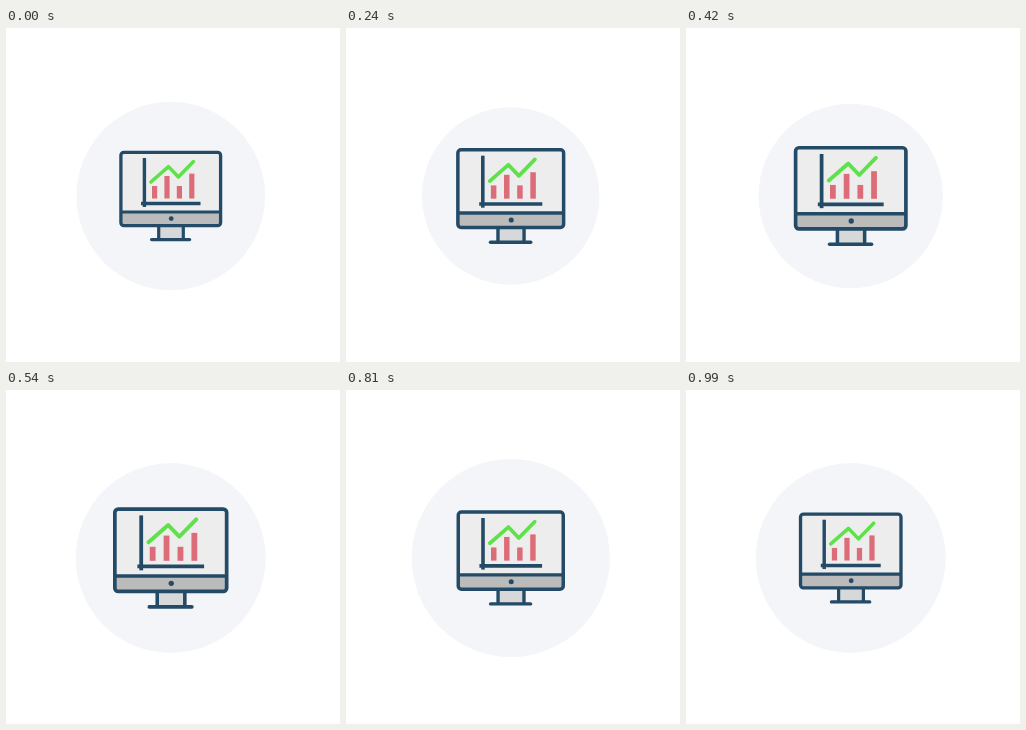
An HTML page with a canvas for the animation above (1020 ms loop, 334 by 334 pixels).

```html
<!DOCTYPE html>
<html lang="en">
<head>
<meta charset="utf-8">
<title>Chart monitor</title>
<style>
  html, body { margin: 0; width: 100%; height: 100%; overflow: hidden; background: #fff; }
  canvas { display: block; width: 334px; height: 334px; }
</style>
</head>
<body>
<canvas id="stage"></canvas>
<script>
const SIZE = 334, LOOP = 1020, STEP = 30;
const CX = 164.75, CY = 168;
const NAVY = '#234a66', RED = '#dc6d78', GREEN = '#5fe14a';

const canvas = document.getElementById('stage');
const ctx = canvas.getContext('2d');
const dpr = window.devicePixelRatio || 1;
canvas.width = canvas.height = Math.round(SIZE * dpr);

// Linear there-and-back: 0 at p = 0, 1 at p = 0.5
const pingPong = p => 1 - Math.abs(1 - 2 * (((p % 1) + 1) % 1));

function line(points, color, width, cap = 'butt') {
  ctx.beginPath();
  points.forEach(([x, y]) => ctx.lineTo(x, y));
  ctx.strokeStyle = color;
  ctx.lineWidth = width;
  ctx.lineCap = cap;
  ctx.lineJoin = 'round';
  ctx.stroke();
}

function disc(x, y, r, color) {
  ctx.beginPath();
  ctx.arc(x, y, r, 0, Math.PI * 2);
  ctx.fillStyle = color;
  ctx.fill();
}

function box(x0, y0, x1, y1, color) {
  ctx.fillStyle = color;
  ctx.fillRect(x0, y0, x1 - x0, y1 - y0);
}

function drawMonitor() {
  // Stand
  box(152.7, 198, 177.3, 211.5, '#d6d8d9');
  line([[152.7, 198], [152.7, 211]], NAVY, 3.2);
  line([[177.3, 198], [177.3, 211]], NAVY, 3.2);
  line([[145.6, 211.6], [183.6, 211.6]], NAVY, 3.2, 'round');

  // Case
  ctx.beginPath();
  ctx.roundRect(114.9, 124.4, 99.7, 73.3, 3);
  ctx.save();
  ctx.clip();
  box(114, 124, 216, 184, '#ededee');
  box(114, 184, 216, 199, '#bbbbbb');
  ctx.restore();
  ctx.strokeStyle = NAVY;
  ctx.lineWidth = 3.3;
  ctx.stroke();
  line([[114.9, 184], [214.6, 184]], NAVY, 3.2);
  disc(165.2, 190.6, 2.4, NAVY);

  // Chart
  line([[138.4, 130], [138.4, 179]], NAVY, 3.4);
  line([[135, 175.5], [194.5, 175.5]], NAVY, 3.4);
  [158, 148, 158, 145.6].forEach((top, i) => {
    const x = 146 + i * 12.4;
    box(x, top, x + 5.2, 170.5, RED);
  });
  line([[144.9, 154], [162.5, 138.6], [172.4, 149], [187.5, 133.5]], GREEN, 3.5, 'round');
}

function draw(t) {
  const p = Math.floor((t % LOOP) / STEP) * STEP / LOOP;
  ctx.setTransform(dpr, 0, 0, dpr, 0, 0);
  box(0, 0, SIZE, SIZE, '#fff');
  disc(CX, CY, 88.4 + 11.7 * pingPong(p + 0.75 - 0.5), '#f4f5f8'.slice(0)) ;
}

function render(t) {
  const p = Math.floor((t % LOOP) / STEP) * STEP / LOOP;
  ctx.setTransform(dpr, 0, 0, dpr, 0, 0);
  box(0, 0, SIZE, SIZE, '#fff');
  // Backdrop runs a quarter loop behind the monitor
  disc(CX, CY, 88.4 + 11.7 * pingPong(p - 0.25), '#f4f5f8');

  const s = 1 + 0.129 * pingPong(p);
  ctx.translate(CX, CY);
  ctx.scale(s, s);
  ctx.translate(-CX, -CY);
  drawMonitor();
}

const start = performance.now();
function tick() {
  render(performance.now() - start);
  requestAnimationFrame(tick);
}
tick();
</script>
</body>
</html>
```
